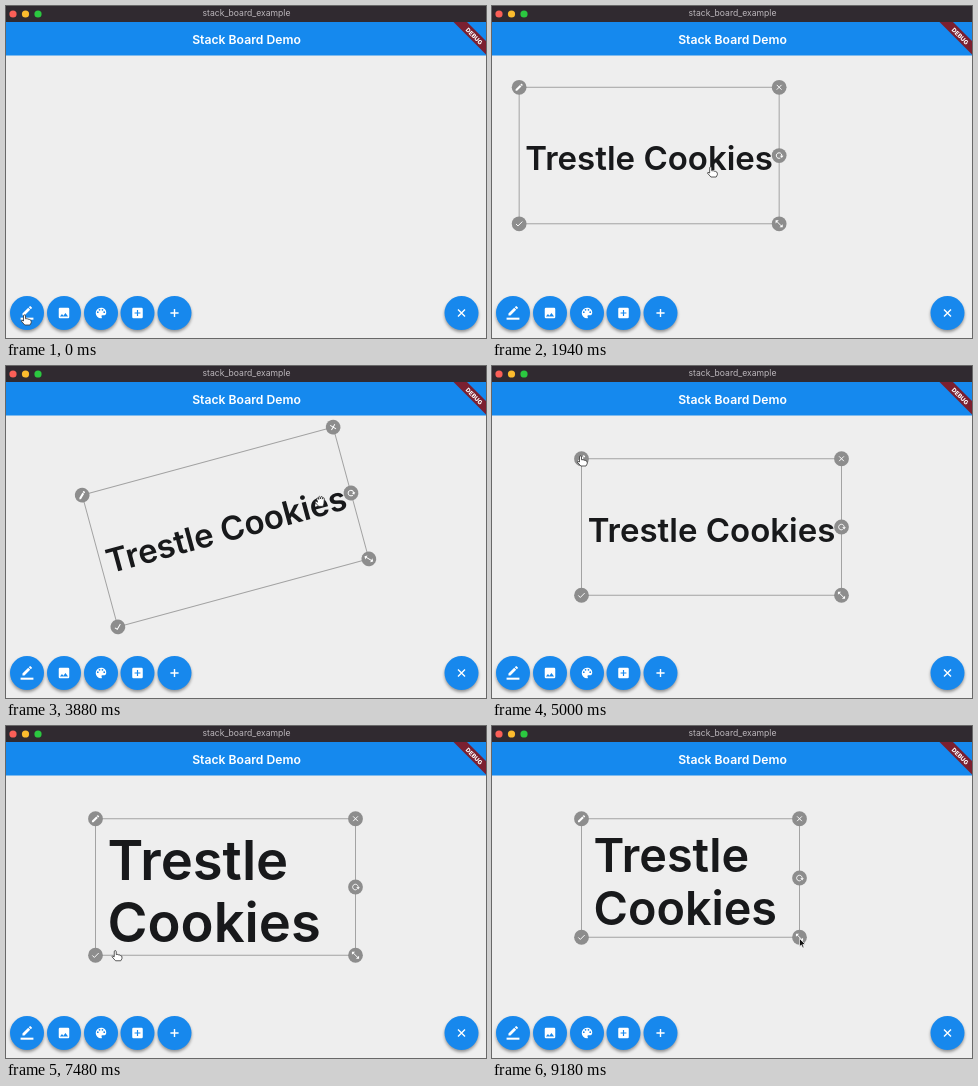
Recreate the animation shown at these times as an HTML page. Size 480x332 px, loop 9.91 s.

```html
<!DOCTYPE html>
<html lang="en">
<head>
<meta charset="utf-8">
<title>Stack Board Demo</title>
<style>
  html, body { margin: 0; width: 100%; height: 100%; overflow: hidden; background: #eee; }
  svg { display: block; width: 100vw; height: 100vh; }
  text { font-family: Inter, Roboto, sans-serif; font-weight: 600; }
  .fab { filter: drop-shadow(0 2px 1.6px rgba(0, 0, 0, .38)); }
  .line { fill: none; stroke: #fff; stroke-width: 2.4; }
</style>
</head>
<body>
<svg viewBox="0 0 480 332">
  <defs>
    <g id="edit" fill="#fff"><path d="M3 17.2V21h3.8L17.8 9.9 14 6.2zM15.1 5.1l3.8 3.8 2-2q.7-.7 0-1.4L18.4 3.200q-.7-.7-1.400 0z"/></g>
    <g id="underlined" fill="#fff"><use href="#edit" transform="translate(1.500 -2.500) scale(.9)"/><path d="M1 20h22v3.500H1z"/></g>
    <path id="image" fill="#fff" fill-rule="evenodd" d="M5 3h14q2 0 2 2v14q0 2-2 2H5q-2 0-2-2V5q0-2 2-2zM5 18h14l-4.500-6-3.500 4.500-2.500-3z"/>
    <g id="palette">
      <path fill="#fff" d="M12 3a9 9 0 0 0 0 18q1.500 0 1.500-1.500c0-1-.8-1-.8-2q0-1.500 1.500-1.500H16q5 0 5-5c0-4.400-4-8-9-8z"/>
      <g fill="#1788ed"><circle cx="6.5" cy="10.500" r="1.500"/><circle cx="9.500" cy="6.500" r="1.500"/><circle cx="14.500" cy="6.500" r="1.500"/><circle cx="17.500" cy="10.500" r="1.500"/></g>
    </g>
    <path id="box" fill="#fff" fill-rule="evenodd" d="M5 3h14q2 0 2 2v14q0 2-2 2H5q-2 0-2-2V5q0-2 2-2zM11 7v4H7v2h4v4h2v-4h4v-2h-4V7z"/>
    <path id="add" class="line" d="M12 5v14M5 12h14"/>
    <path id="close" class="line" d="M6 6l12 12M18 6L6 18"/>
    <path id="check" class="line" d="M4 12.500l5 5L20 6.500"/>
    <g id="rotate"><path class="line" d="M15 18.300A7 7 0 1 1 18.500 14"/><path fill="#fff" d="M14 12.500h9l-4.500 6z"/></g>
    <g id="resize"><path class="line" d="M6 6l12 12"/><path fill="#fff" d="M3 3h8l-8 8zM21 21h-8l8-8z"/></g>

    <g id="point" fill="#fff" stroke="#333" stroke-width=".8" stroke-linejoin="round">
      <path d="M-2.500 1V-4q0-1.200 1-1.200t1 1.200v2.800q2-.5 2.500.4 1.600-.3 1.900.7 1.300 0 1.300 1.300v1.600L4 5H-1.200L-4.800 1q0-1.400 2.300 0z"/>
    </g>
    <g id="grab" fill="#fff" stroke="#333" stroke-width=".8" stroke-linejoin="round">
      <path d="M-2.500.8L-3.600-2.500q.3-1.500 1.400-.6l.8 1.200-.2-2.500q.8-1.300 1.500 0l.3 2 .6-2.200q1-.9 1.500.3l-.2 2.100.8-1.200q1.100-.6 1.300.5L3.700 2.500 2.800 5H-1.500L-5 1q-.1-1.300 1.100-.9z"/>
    </g>
    <path id="beam" fill="none" stroke="#444" stroke-width=".9" d="M-2-4.500q2 0 2 1.500v6q0 1.500-2 1.500M2-4.500q-2 0-2 1.500v6q0 1.500 2 1.500M-1 1h2"/>
    <path id="arrow" fill="#111" stroke="#fff" stroke-width=".7" d="M0 0v8.200l1.900-1.700 1.300 3 1.400-.6-1.300-2.900h2.600z"/>
  </defs>

  <rect width="480" height="332" fill="#eee"/>
  <g id="item">
    <rect id="frame" fill="none" stroke="#a3a3a3"/>
    <text id="single" font-size="33" y="14.500" text-anchor="middle" fill="#18191b">Trestle Cookies</text>
    <g id="double" fill="#18191b"><text>Trestle</text><text>Cookies</text></g>
    <g id="field" fill="#1889ed">
      <rect x="-121.500" y="54" width="243" height="4"/>
      <rect id="caret" y="-2" width="4" height="44" rx="2"/>
    </g>
  </g>

  <rect y="16" width="480" height="33.500" fill="#1589ee"/>
  <text x="240.500" y="37.600" font-size="12.2" text-anchor="middle" fill="#fff">Stack Board Demo</text>
  <path d="M447.500 16H461L480 35V48.500z" fill="#7b2030"/>
  <text transform="translate(467.300 31) rotate(45)" y="1" font-size="6" style="font-weight:800" text-anchor="middle" fill="#fff">DEBUG</text>
  <rect width="480" height="16" fill="#302a30"/>
  <circle cx="7" cy="8" r="3.600" fill="#fb5f57"/>
  <circle cx="19.500" cy="8" r="3.600" fill="#fcbc2e"/>
  <circle cx="32" cy="8" r="3.600" fill="#2bc840"/>
  <text x="240.500" y="10.300" font-size="8.6" style="font-weight:400" text-anchor="middle" fill="#bcb7bc">stack_board_example</text>
  <g id="fabs"></g>
  <use id="cursor"/>
</svg>
<script>
const LOOP = 9910;
const $ = id => document.getElementById(id);

function make(parent, tag, attrs) {
  const el = document.createElementNS('http://www.w3.org/2000/svg', tag);
  set(el, attrs);
  return parent.appendChild(el);
}
function set(el, attrs) {
  for (const k in attrs) el.setAttribute(k, attrs[k]);
}
function show(el, on) {
  el.style.display = on ? '' : 'none';
}
function button(parent, icon, r, fill, size) {
  const g = make(parent, 'g', {});
  make(g, 'circle', { r, fill });
  g.icon = make(g, 'use', {
    href: '#' + icon,
    transform: `scale(${size / 24}) translate(-12 -12)`
  });
  return g;
}
const place = (el, x, y) => el.setAttribute('transform', `translate(${x} ${y})`);

// Rows are [time, ...values]; values run straight from row to row.
function at(rows, t) {
  if (t <= rows[0][0]) return rows[0].slice(1);
  for (let i = 1; i < rows.length; i++) {
    const a = rows[i - 1], b = rows[i];
    if (t < b[0]) {
      const p = (t - a[0]) / (b[0] - a[0]);
      return a.slice(1).map((v, j) => v + (b[j + 1] - v) * p);
    }
  }
  return rows[rows.length - 1].slice(1);
}

const ADDED = 300, SPIN = 2880, SPUN = 4250, EDIT = 5030, DONE = 7030;
const centre = [[1210, 138, 125], [1940, 157, 149.5], [2350, 219.5, 161]];
const angle = [[2880, 0], [3090, 76.4], [3820, 344.8], [3880, 344.8], [4250, 360]];
const size = [[7850, 260, 136.5], [8420, 223.5, 147.5], [8900, 218, 118.5]];
const orbit = [[2880, 129, 0], [3090, 61, 128], [3820, 98, 344.8], [3880, 98, 344.8], [4250, 129, 360]];
const pointer = [
  [400, 20, 314], [1000, 201, 141], [1210, 201, 141], [1940, 220, 166],
  [2350, 282, 177], [2640, 348, 161], [4250, 348, 161], [4670, 90, 95],
  [5580, 90, 95], [6060, 226, 139], [6910, 226, 139], [7030, 91, 230],
  [7450, 91, 230], [7850, 346, 227], [8420, 304, 235], [8900, 307, 212], [9180, 307.5, 212.5]
];
const shapes = [
  [0, 'point'], [SPIN, 'grab'], [SPUN, 'point'], [5800, 'beam'],
  [6930, 'point'], [7850, 'grab'], [8900, 'arrow']
];

[['underlined', 21], ['image', 58], ['palette', 95], ['box', 131.5], ['add', 168.5], ['close', 455.5]]
  .forEach(([icon, x]) => {
    const fab = button($('fabs'), icon, 17, '#1788ed', 14);
    fab.setAttribute('class', 'fab');
    place(fab, x, 307);
  });

const corners = [['edit', -1, -1], ['close', 1, -1], ['rotate', 1, 0], ['resize', 1, 1], ['check', -1, 1]]
  .map(([icon, x, y]) => ({ el: button($('item'), icon, 7.4, '#8d8d8d', 9.5), x, y }));
const lines = [...$('double').children];

function drawItem(t) {
  const [x, y] = at(centre, t), [w, h] = at(size, t), [turn] = at(angle, t);
  const editing = t >= EDIT && t < DONE;
  show($('item'), t >= ADDED);
  // The top left corner stays put while resizing.
  set($('item'), {
    transform: `translate(${x + (w - 260) / 2} ${y + (h - 136.5) / 2}) rotate(${turn})`
  });
  set($('frame'), { x: -w / 2, y: -h / 2, width: w, height: h });
  corners.forEach(c => place(c.el, c.x * w / 2, c.y * h / 2));
  set(corners[0].el.icon, { href: editing ? '#underlined' : '#edit' });

  show($('single'), t < EDIT);
  show($('double'), t >= EDIT);
  show($('field'), editing);
  const font = editing ? 34 : Math.min(w * .2145, h * .398);
  const gap = editing ? 40 : font * 1.14;
  const base = editing ? 12 : font * .44;
  lines.forEach((line, i) => set(line, {
    'font-size': font,
    x: editing ? -123 : 12 - w / 2,
    y: base + (i - .5) * gap
  }));
  if (editing) {
    const lit = t < 5270 || (t >= 5580 && t < 6285) || t >= 6510;
    show($('caret'), lit);
    set($('caret'), { x: -123 + lines[1].getComputedTextLength() });
  }
}

function drawCursor(t) {
  let [x, y] = at(pointer, t);
  if (t >= SPIN && t < SPUN) {
    const [r, a] = at(orbit, t), [cx, cy] = at(centre, t);
    x = cx + r * Math.cos(a * Math.PI / 180);
    y = cy + r * Math.sin(a * Math.PI / 180);
  }
  const shape = shapes.filter(s => s[0] <= t).pop()[1];
  set($('cursor'), { href: '#' + shape });
  place($('cursor'), x, y);
}

const start = performance.now();
function frame() {
  const t = (performance.now() - start) % LOOP;
  drawItem(t);
  drawCursor(t);
  requestAnimationFrame(frame);
}
frame();
</script>
</body>
</html>
```
